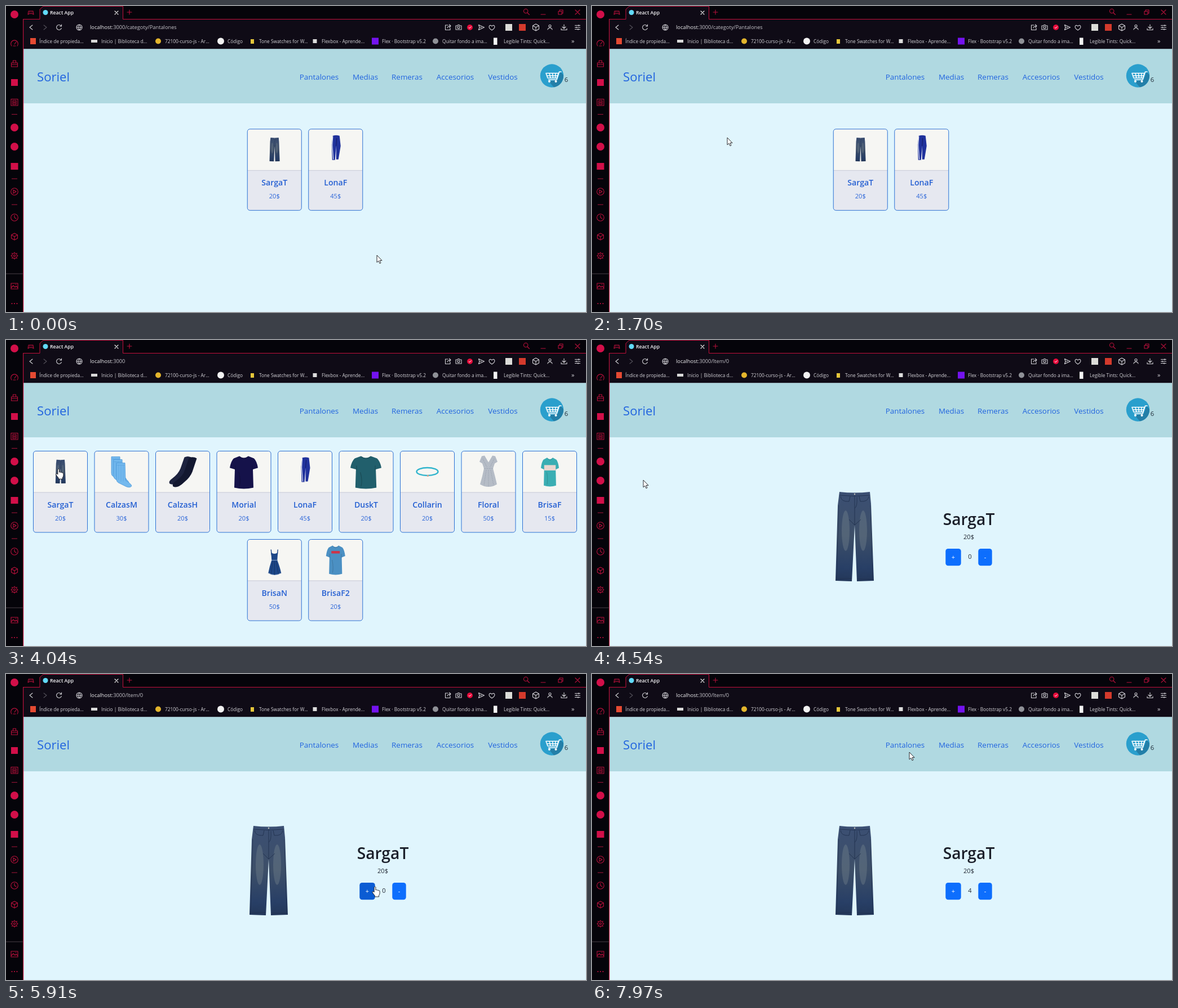
An HTML page for the animation above (8 s loop, 1029 px wide and 544 px high).

```html
<!DOCTYPE html>
<html lang="es">
<head>
<meta charset="utf-8">
<title>Tienda</title>
<style>
html, body { margin: 0; width: 100%; height: 100%; overflow: hidden; background: #e0f5fd; }
svg { display: block; width: 100%; height: 100%; font-family: "Open Sans", "Noto Sans", sans-serif; }
.line { fill: none; stroke-width: 1.1; stroke-linecap: round; stroke-linejoin: round; }
.red { stroke: #b9113c; }
.white { stroke: #d2d1d6; }
.mid { text-anchor: middle; }
.semi { font-weight: 600; }
</style>
</head>
<body>
<svg id="stage" viewBox="0 0 1029 544" xmlns="http://www.w3.org/2000/svg"></svg>
<script>
const LOOP = 8000;
const stage = document.getElementById('stage');

const text = (x, y, size, fill, str, extra = '') =>
  `<text x="${x}" y="${y}" font-size="${size}" fill="${fill}" ${extra}>${str}</text>`;
const rect = (x, y, w, h, fill, extra = '') =>
  `<rect x="${x}" y="${y}" width="${w}" height="${h}" fill="${fill}" ${extra}/>`;
const disc = (x, y, r, fill) => `<circle cx="${x}" cy="${y}" r="${r}" fill="${fill}"/>`;
const shape = (d, fill, extra = '') => `<path d="${d}" fill="${fill}" ${extra}/>`;
const at = (x, y, body, scale = 1) => `<g transform="translate(${x} ${y}) scale(${scale})">${body}</g>`;
const icon = (x, y, d, tone = 'white') => at(x, y, `<path class="line ${tone}" d="${d}"/>`);
const ring = r => `M${-r} 0a${r} ${r} 0 1 0 ${2 * r} 0a${r} ${r} 0 1 0 ${-2 * r} 0`;

const CUBE = 'M0-6L5.5-3V3L0 6L-5.5 3V-3ZM-5.5-3L0 0L5.5-3M0 0V6';
const CROSS = 'M-4-4L4 4M4-4L-4 4';

function sidebar() {
  const red = '#d20f49';
  const dash = y => rect(10, y, 10, 1.2, '#8d1233');
  const gear = Array.from({ length: 8 }, (_, i) => {
    const a = i * Math.PI / 4, c = Math.cos(a), s = Math.sin(a);
    return `M${(4.6 * c).toFixed(1)} ${(4.6 * s).toFixed(1)}L${(6.3 * c).toFixed(1)} ${(6.3 * s).toFixed(1)}`;
  }).join('');
  return rect(0, 0, 31, 544, '#05040a')
    + disc(15, 15, 7, red)
    + icon(15, 67, 'M-5 4A6.3 6.3 0 1 1 5 4M0 1L3-3M-2 4H2', 'red')
    + icon(15, 102, 'M-5.5-1H5.5V6H-5.5ZM-2.5-1V-5H2.5V-1M-5.5 2H5.5', 'red')
    + rect(9, 130, 12, 12, red)
    + icon(15, 171, 'M-6-5.5H6V6H-6ZM-3-3H3V4H-3ZM-1-1V2M1-1V2', 'red')
    + dash(192) + disc(15, 216, 7, red) + disc(15, 250, 7, red)
    + rect(8.5, 279, 13, 12, red) + dash(306.5)
    + icon(15, 330, ring(6.3) + 'M-2-3L3 0L-2 3Z', 'red') + dash(352.5)
    + icon(15, 376, ring(6.3) + 'M0-4V0L3 2', 'red')
    + icon(15, 410, CUBE, 'red')
    + icon(15, 444, ring(4.6) + ring(1.7) + gear, 'red')
    + rect(0, 475.5, 30, 1, '#4a4149')
    + icon(15, 498, 'M-6-5H6V5H-6ZM-6 3L-2-1L1 2L3 0L6 3M2-3H3', 'red')
    + [-4.5, 0, 4.5].map(dx => disc(15 + dx, 529, 1.1, '#c41140')).join('');
}

function browser() {
  const bookmarks = [
    [59, 'Índice de propieda...'], [169, 'Inicio | Biblioteca d...'], [282, '72100-curso-js - Ar...'],
    [393, 'Código'], [449, 'Tone Swatches for W...'], [560, 'Flexbox - Aprende...'],
    [667, 'Flex · Bootstrap v5.2'], [774, 'Quitar fondo a ima...'], [883, 'Legible Tints: Quick...']
  ];
  return rect(31, 0, 998, 23, '#05040a') + rect(31, 23, 998, 53.5, '#0f0b16')
    + shape('M31 23.5H60V6L66 .5H207.5V23.5H1029', '#0f0b16', 'stroke="#c3103c"')
    + icon(44, 12, 'M-5 3L-4-3H4L5 3L2.5 1.5H-2.5ZM-2.5-1H-1M1.5-1H2.5', 'red')
    + disc(70, 11.5, 4.5, '#61dafb')
    + text(78, 15.3, 8.7, '#f4f4f6', 'React App', 'class="semi"')
    + at(196, 12, `<path class="line" stroke="#eee" d="M-3-3L3 3M3-3L-3 3"/>`)
    + icon(219, 11, 'M-4 0H4M0-4V4', 'red')
    + icon(923, 10, 'M-4.5-1a3.7 3.7 0 1 0 7.4 0a3.7 3.7 0 1 0 -7.4 0M2 2L5.5 5.5', 'red')
    + icon(953, 15, 'M-4 0H4', 'red')
    + icon(984, 11, 'M-4-1.5H2V4H-4ZM-2-1.5V-4H4V2H2', 'red') + icon(1014, 11, CROSS, 'red')
    + icon(45, 38, 'M2-4L-3 0L2 4')
    + `<g opacity=".35">${icon(69, 38, 'M-2-4L3 0L-2 4')}</g>`
    + icon(94, 38, 'M4.3 1.5A4.5 4.5 0 1 1 3.5-3M4.5-5V-2H1.5')
    + icon(130, 38, ring(5) + 'M-5 0H5M0-5Q-4 0 0 5Q4 0 0-5')
    + icon(784, 38, 'M0-4H-4.5V4.5H4V1M-1 1Q0-2.5 4.5-2.5M2.5-5L5-2.5L2.5 0')
    + icon(803, 38, 'M-5-3H-2L-1-4.5H1L2-3H5V4H-5Z' + ring(2))
    + disc(823, 38, 5, '#e60c3c') + `<path d="M821 38L822.5 39.7L825.5 36.4" fill="none" stroke="#fff"/>`
    + icon(843, 38, 'M-4.5-4.5L5.5 0L-4.5 4.5L-3 0ZM-3 0H1')
    + icon(862, 38.5, 'M0 4.5C-9-1-3.5-7 0-2.5C3.5-7 9-1 0 4.5Z')
    + rect(886, 32, 12, 12, '#dcdcd8') + rect(910, 32, 12, 12, '#d43a2c')
    + icon(940, 38, CUBE) + icon(965, 37, 'M-2-1.5a2 2 0 1 0 4 0a2 2 0 1 0 -4 0M-4 5Q-3.5 2 0 2T4 5')
    + icon(990, 38, 'M0-5V2M-3-1L0 2L3-1M-5 2V4.5H5V2')
    + icon(1014, 38, 'M-4.5-3.5H4.5M-4.5 0H4.5M-4.5 3.5H4.5M2-4.5V-2.5M-2-1V1M1 2.5V4.5')
    + rect(43, 57, 10, 11, '#e44a32') + rect(151, 60, 11, 5, '#d9d9d9') + disc(270, 62.5, 5, '#e3b52c')
    + disc(381, 62.5, 6, '#f2f2f2') + rect(434, 59, 6, 8, '#e5c63a') + rect(544.5, 59, 7, 7, '#dcdcdc')
    + rect(649, 56.5, 12, 12, '#7413ee') + disc(762, 62.5, 5, '#8f9197') + rect(865, 56.5, 6.5, 12.5, '#f4f4f4')
    + bookmarks.map(([x, label]) => text(x, 65.8, 8.3, '#d4d3d8', label)).join('')
    + text(1003, 66, 11, '#d4d3d8', '»');
}

function siteHeader() {
  const links = [[555.5, 'Pantalones'], [637.5, 'Medias'], [711.5, 'Remeras'], [797, 'Accesorios'], [881.5, 'Vestidos']];
  return rect(31, 76.5, 998, 96.5, '#b0d9e1')
    + text(55, 134, 22.1, '#2164df', 'Soriel', 'id="brand"')
    + links.map(([x, label]) => text(x, 130.6, 13.4, '#2164df', label, 'class="mid"')).join('')
    + disc(968.5, 124, 20.7, '#2a9fcd')
    + shape('M963 134L972 144.4A20.7 20.7 0 0 0 989 123L984 117L979 131Z', '#237fa8')
    + `<path class="line" stroke="#fff" style="stroke-width:1.5" d="M985 117H981.5L977 131H962.5M958 119.5H980L977.5 128H961ZM964 119.5L966 128M969.5 119.5L970.5 128M975 119.5L974.5 128M959.5 124H979"/>`
    + disc(964, 134, 2, '#fff') + disc(975.5, 134, 2, '#fff')
    + text(994, 135, 11.3, '#212c38', '6', 'class="mid"');
}

// Clothing, drawn in the coordinates of a card's picture area
const tee = (x, y, w, h, fill, extra = '') => `<g transform="translate(${x} ${y}) scale(${w / 50} ${h / 60})">`
  + shape('M17 1Q25 7 33 1L43 5Q48 10 50 22L41 25L42 58Q25 62 8 58L9 25L0 22Q2 10 7 5Z', fill)
  + `<path d="M17 1Q25 10 33 1M10 18V26M40 18V26M16 30Q20 45 17 56" fill="none" stroke="#000" stroke-opacity=".22"/>${extra}</g>`;

const jeans = shape('M7 1Q34 4 61 1L63 22L68 159L38 160L34 60L29 160L0 159L4 25Z', 'url(#denim)')
  + '<ellipse cx="18" cy="70" rx="7" ry="36" fill="#7b8a93" opacity=".35"/><ellipse cx="49" cy="70" rx="7" ry="36" fill="#7b8a93" opacity=".35"/>'
  + '<path d="M7 7Q34 10 61 7M34 9V60M9 9Q10 19 24 18L26 9M59 9Q58 19 44 18L42 9M34 30Q39 28 38 10M34 60L24 50M34 60L45 50" fill="none" stroke="#1d2c48" stroke-opacity=".75"/>'
  + '<path d="M1 155H29M38 156H67M6 25L2 155M62 25L66 155" fill="none" stroke="#1c2b47" stroke-opacity=".5"/>'
  + disc(34, 5, 1.2, '#c6c4b8');

const sock = (x, y) => at(x, y, shape('M0 0H15L16 31Q26 37 27 41Q24 45 17 42L3 35Q0 33 0 29Z', '#74b9ee', 'stroke="#4c98d8" stroke-width=".8"')
  + '<path d="M4 3V30M8 3V33M12 3V33M0 4H15" stroke="#559fdc" stroke-width=".6"/>');

const products = {
  jeans: ['SargaT', 20, at(39.3, 15, jeans, .265)],
  blueSocks: ['CalzasM', 30, sock(30, 10) + sock(34, 15) + sock(39, 21)],
  navySocks: ['CalzasH', 20, shape('M51 11Q57 8 63 11L55 34Q51 44 42 52Q32 62 25 58Q22 54 29 49Q40 41 44 31Z', '#1d233f')
    + shape('M59 12Q67 9 73 13L65 37Q61 47 51 55Q39 67 31 63Q28 58 36 53Q49 44 52 33Z', '#131830')],
  navyTee: ['Morial', 20, tee(23, 8, 50, 59, '#15124a')],
  track: ['LonaF', 45, shape('M43 12Q49 10 55 12L57 30L53 54H49L49 30L47 55H42L41 28Z', '#20329c')
    + '<path d="M43 13L42 29L44 54" fill="none" stroke="#dfe4f3" stroke-width="1.2"/><path d="M49 30L50 16" stroke="#131c63"/>'],
  tealTee: ['DuskT', 20, tee(20, 8, 55, 59, '#215f6c')],
  ring: ['Collarin', 20, '<ellipse cx="48" cy="36.5" rx="19" ry="7" fill="none" stroke="#31b5cd" stroke-width="2.4"/>' + disc(49, 43.8, 1.6, '#d99b86')],
  floral: ['Floral', 50, shape('M36 9L41 8L48 20L55 8L60 9L64 19L59 22L56 31Q60 46 63 59Q48 68 33 59Q37 46 40 31L37 22L32 19Z', '#b5bcc6')
    + '<path d="M40 31H56M44 34L40 61M48 34V63M52 34L57 61M38 14L45 28M58 14L51 28" fill="none" stroke="#848f9f" stroke-width="1" stroke-dasharray="1 2"/>'],
  bandTee: ['BrisaF', 15, tee(32.5, 11, 32, 52, '#3aaeb3', rect(9, 16, 32, 11, '#ead6cf'))],
  navyDress: ['BrisaN', 50, '<path d="M43 28L42 18M53 28L54 18" stroke="#1b4384" stroke-width="1.4"/>'
    + shape('M42 23Q48 28 54 23L53 37Q58 50 60 60Q48 67 37 60Q39 49 43 37Z', '#1d4788')
    + '<path d="M38 60Q48 66 59 60M43 37H53" fill="none" stroke="#c8d7e8" stroke-dasharray="1.5 1"/><path d="M45 39L42 61M48 39V63M51 39L55 61" stroke="#12305f" stroke-width=".8"/>'],
  skyTee: ['BrisaF2', 20, tee(31, 10, 34, 53, '#4b90c3', rect(14, 12, 22, 5, '#cf3448'))]
};

const CARD_W = 96, CARD_H = 144.5;
const place = (keys, column, y) => keys.map((key, i) => ({ key, x: 48.5 + 108.5 * (column + i), y }));
const homeCards = [
  ...place(['jeans', 'blueSocks', 'navySocks', 'navyTee', 'track', 'tealTee', 'ring', 'floral', 'bandTee'], 0, 197.5),
  ...place(['navyDress', 'skyTee'], 3.5, 354.5)
];
const categoryCards = place(['jeans', 'track'], 3.5, 218.8);

function card({ key, x, y }) {
  const [name, price, art] = products[key];
  return at(x, y, rect(0, 0, CARD_W, CARD_H, '#e6e8f0', 'rx="4.5"')
    + shape('M0 73.3V4.5Q0 0 4.5 0H91.5Q96 0 96 4.5V73.3Z', '#f6f6f3')
    + rect(0, 73, CARD_W, 1, '#c8cad8') + art
    + rect(0, 0, CARD_W, CARD_H, 'none', 'rx="4.5" stroke="#2b70d3"')
    + text(48, 100.5, 14.1, '#245fd2', name, 'class="mid semi"')
    + text(48, 123.5, 11.1, '#2c66d8', price + '$', 'class="mid"'));
}

const itemPage = at(432, 269, jeans)
  + text(668.5, 328.5, 28.2, '#1b1f2a', 'SargaT', 'class="mid semi"')
  + text(668.5, 354, 11.1, '#212833', '20$', 'class="mid"')
  + rect(627.3, 371, 27.4, 30.2, '#0d6efd', 'rx="4.5" id="plus"') + text(641, 390, 11, '#fff', '+', 'class="mid"')
  + rect(685.3, 371, 24.4, 30.2, '#0d6efd', 'rx="4.5"') + text(697.5, 390, 11, '#fff', '-', 'class="mid"')
  + text(670.3, 389, 11.1, '#212833', '0', 'class="mid" id="count"');

const ARROW = 'M0 0V12.8L2.9 10.2L5 14.7L7 13.8L5 9.4H9Z';
const HAND = 'M-1.4 1Q0-1 1.4 1V6Q3 4.8 4 6.4Q5.6 5.4 6.4 7Q8.4 6.3 8.6 8.4V12Q8.4 14 7 15.5V18H-.2V16Q-3 13-4.6 10Q-4.6 8-2.6 8.6L-1.4 10Z';

stage.innerHTML = `<defs><linearGradient id="denim" x2="0" y2="1">
  <stop stop-color="#3b4f73"/><stop offset=".5" stop-color="#3d4f68"/><stop offset=".85" stop-color="#283f66"/><stop offset="1" stop-color="#233759"/>
</linearGradient></defs>`
  + rect(0, 0, 1029, 544, '#e0f5fd') + sidebar() + browser() + siteHeader()
  + text(149, 41.3, 9.25, '#f0f0f2', '', 'id="url"')
  + rect(30, 23, 1.2, 521, '#b9113c')
  + `<g id="category">${categoryCards.map(card).join('')}</g>`
  + `<g id="home">${homeCards.map(card).join('')}</g>`
  + `<g id="item">${itemPage}</g>`
  + '<path id="cursor" fill="#fff" stroke="#15151a" stroke-width=".9" stroke-linejoin="round"/>';

const el = Object.fromEntries([...stage.querySelectorAll('[id]')].map(node => [node.id, node]));

const pages = {
  category: { path: '/categoty/Pantalones', cards: categoryCards },
  home: { path: '', cards: homeCards },
  item: { path: '/Item/0', cards: [] }
};
const clicks = [6180, 6410, 6640, 6870];
// time, x, y of the pointer's rests and turns
const route = [
  [0, 658, 443], [800, 658, 443], [1700, 240, 234], [2420, 104, 135], [3740, 104, 135],
  [4150, 91, 249], [4600, 91, 249], [5700, 654.5, 378], [7080, 654.5, 378], [7950, 563, 139], [LOOP, 563, 139]
];

function pointerAt(t) {
  const i = route.findIndex(stop => stop[0] > t);
  const [t0, x0, y0] = route[i - 1], [t1, x1, y1] = route[i];
  const u = (t - t0) / (t1 - t0), k = u * u * (3 - 2 * u);
  return [x0 + (x1 - x0) * k, y0 + (y1 - y0) * k];
}

function draw() {
  const t = performance.now() % LOOP;
  const [x, y] = pointerAt(t);
  const inside = (left, top, w, h) => x >= left && x <= left + w && y >= top && y <= top + h;
  const page = t < 2540 ? 'category' : t < 4260 ? 'home' : 'item';

  for (const name in pages) el[name].style.display = name === page ? '' : 'none';
  el.url.innerHTML = `localhost<tspan fill="#c5c4ca">:3000${pages[page].path}</tspan>`;
  el.count.textContent = clicks.filter(c => c <= t).length;

  const onBrand = inside(55, 108, 59, 32);
  const onPlus = page === 'item' && inside(627, 371, 28, 30);
  const onCard = pages[page].cards.some(c => inside(c.x, c.y, CARD_W, CARD_H));
  el.brand.setAttribute('fill', onBrand ? '#1553bd' : '#2164df');
  el.plus.setAttribute('fill', onPlus ? '#0b5cd3' : '#0d6efd');
  el.cursor.setAttribute('d', onBrand || onPlus || onCard ? HAND : ARROW);
  el.cursor.setAttribute('transform', `translate(${x} ${y})`);
  requestAnimationFrame(draw);
}
draw();
</script>
</body>
</html>
```
